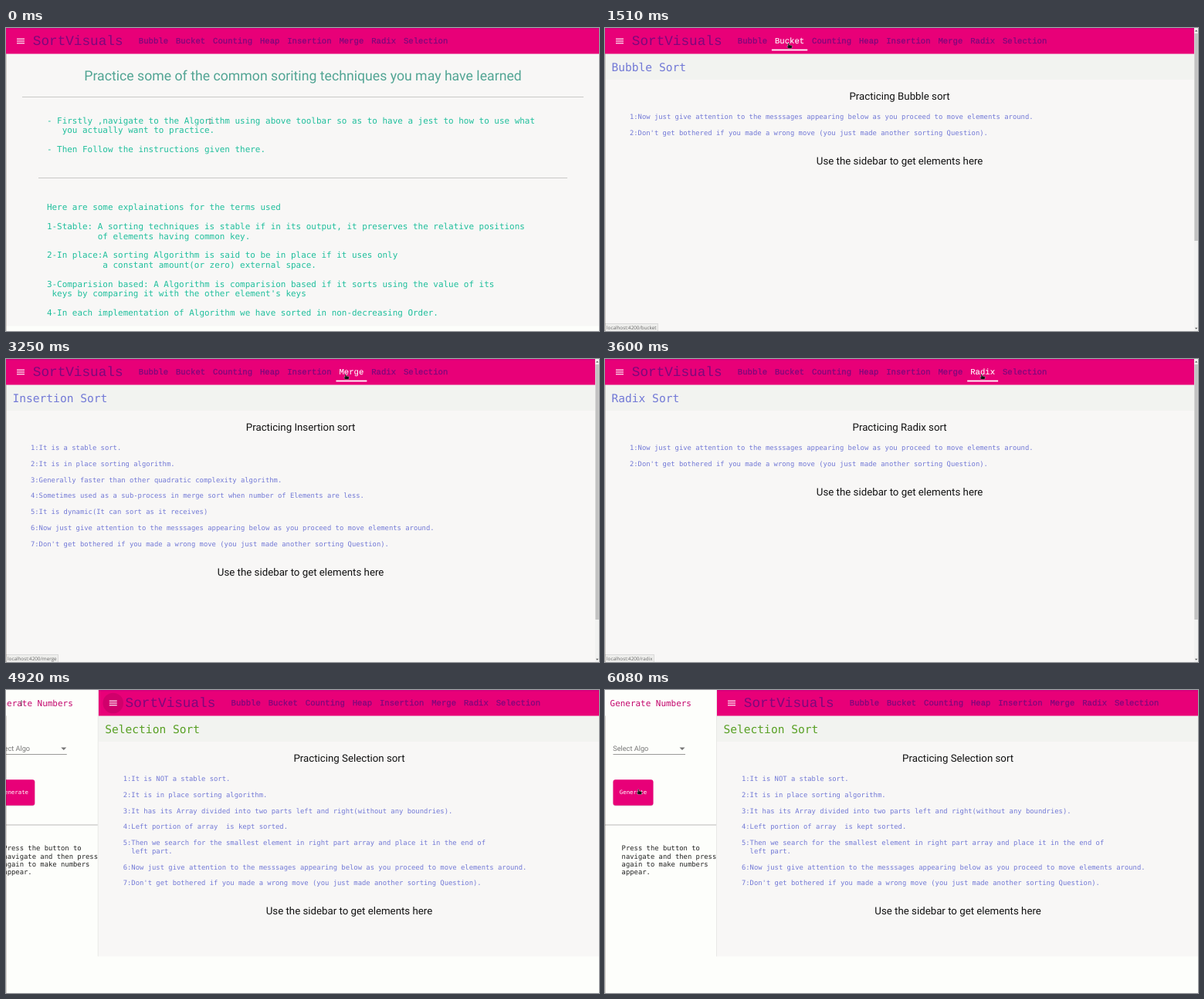
Write an HTML page that moves like this. It is 768x393 px and loops after 6100 ms.

```html
<!DOCTYPE html>
<html lang="en">
<head>
<meta charset="utf-8">
<title>SortVisuals</title>
<style>
  html, body { margin: 0; width: 100%; height: 100%; overflow: hidden; background: #fdfefb; }
  svg { display: block; width: 768px; height: 393px; }
  text { white-space: pre; text-rendering: geometricPrecision; }
  .mono { font-family: "DejaVu Sans Mono", monospace; }
  .nav { font-family: "Liberation Mono", monospace; fill: #7d087c; }
  .link { font-size: 10.64px; stroke: #7d087c; stroke-width: .25px; }
  .link.on { fill: #fff; stroke: #fff; stroke-width: .1px; }
  .sans { font-family: Roboto, sans-serif; }
  .mid { text-anchor: middle; }
  .status { font: 6.3px "Open Sans", sans-serif; fill: #666; }
</style>
</head>
<body>
<svg id="stage" viewBox="0 0 768 393"></svg>
<script>
const PINK = '#e80078', BLUE = '#7279d6', LOOP = 6100;

const rect = (x, y, w, h, fill, more = '') =>
  `<rect x="${x}" y="${y}" width="${w}" height="${h}" fill="${fill}" ${more}/>`;
const text = (x, y, size, fill, s, cls = 'mono') =>
  `<text x="${x}" y="${y}" font-size="${size}" fill="${fill}" class="${cls}">${s}</text>`;
const group = (id, body, more = '') => `<g id="${id}" ${more}>${body}</g>`;

// Navigation links, laid out from their character counts
let nextX = 171.8;
const links = ['Bubble', 'Bucket', 'Counting', 'Heap', 'Insertion', 'Merge', 'Radix', 'Selection'].map(name => {
  const link = { name, x: nextX, w: name.length * 6.384 };
  nextX += link.w + 9.8;
  return link;
});

const closing = n => [
  `${n}:Now just give attention to the messsages appearing below as you proceed to move elements around.`, '',
  `${n + 1}:Don't get bothered if you made a wrong move (you just made another sorting Question).`];

const homeLines = [
  '- Firstly ,navigate to the Algorithm using above toolbar so as to have a jest to how to use what',
  '   you actually want to practice.', '',
  '- Then Follow the instructions given there.', '', '', '', '', '',
  'Here are some explainations for the terms used', '',
  '1-Stable: A sorting techniques is stable if in its output, it preserves the relative positions',
  '          of elements having common key.', '',
  '2-In place:A sorting Algorithm is said to be in place if it uses only',
  '           a constant amount(or zero) external space.', '',
  '3-Comparision based: A Algorithm is comparision based if it sorts using the value of its',
  " keys by comparing it with the other element's keys", '',
  '4-In each implementation of Algorithm we have sorted in non-decreasing Order.'];

const pages = {
  Counting: {
    title: '#808080', ink: '#1c1c1c', thumb: 276, heading: 'Practicing Counting Sort.',
    footer: 'Get elements here using sidebar', footInk: '#7b7b7b',
    xs: [274.3, , 248, , 146.6, , 194.6, , 250.5, , 258.5, 352, , 256, 269.5, , 295.7],
    lines: [
      '1:Its correct Implementation is stable always.', '',
      '2:It is used as a subsequence for Radix and Bucket Sort.', '',
      '3:Its complexity is pseudo-linear( based on values of elements and not on number of elements).', '',
      '4:It uses an extra array to keep record of how many times a key is occuring', '',
      '5:Its principle is similar to as of PiegonHole Sorting.', '',
      '6:In this exercise Stability of counting sort is not',
      'taken into account.', '',
      '7:To follow this exercise just count number of times',
      'a value is present and use slider to indicate this', '',
      '8:On completion click on Make My Array']
  },
  Insertion: {
    thumb: 338,
    lines: [
      '1:It is a stable sort.', '',
      '2:It is in place sorting algorithm.', '',
      '3:Generally faster than other quadratic complexity algorithm.', '',
      '4:Sometimes used as a sub-process in merge sort when number of Elements are less.', '',
      '5:It is dynamic(It can sort as it receives)', '', ...closing(6)]
  },
  Selection: {
    title: '#58a024', bottom: 345.5,
    lines: [
      '1:It is NOT a stable sort.', '',
      '2:It is in place sorting algorithm.', '',
      '3:It has its Array divided into two parts left and right(without any boundries).', '',
      '4:Left portion of array  is kept sorted.', '',
      '5:Then we search for the smallest element in right part array and place it in the end of',
      '  left part.', '', ...closing(6)]
  },
  Bubble: { thumb: 276 }, Bucket: { thumb: 276 }, Heap: { thumb: 310 },
  Merge: { thumb: 338 }, Radix: { thumb: 338 }
};

function sortPage(name, p) {
  const { title = BLUE, ink = BLUE, thumb, bottom = 393, lines = closing(1), xs = [] } = p;
  const mid = thumb ? 381.6 : 384.6;
  const footY = 156 + (lines.length - 1) * 10.42;
  const button = name !== 'Counting' ? '' :
    rect(138, 41.5, 66, 19, '#0003', 'rx="2"') + rect(138, 40.5, 66, 19, '#fff', 'rx="2"') +
    text(171, 52.7, 7.35, '#111', 'Make My Array', 'sans mid" font-weight="500');
  return rect(0, 33, 768, bottom - 33, '#f8f7f6') + rect(0, 33, 768, 34, '#f2f3f0') +
    text(8.4, 55.5, 14.6, title, name + ' Sort') + button +
    lines.map((s, i) => text(xs[i] ?? 31.9, 117.9 + i * 10.42, 8.87, ink, s)).join('') +
    `<g class="centred">` +
    text(mid, 92.9, 13.28, '#111', p.heading || `Practicing ${name} sort`, 'sans mid') +
    text(mid, footY, 13.28, p.footInk || '#111', p.footer || 'Use the sidebar to get elements here', 'sans mid') +
    `</g>`;
}

const homePage = rect(0, 33, 768, 353.5, '#f8f7f6') +
  text(384.5, 67.8, 17.7, '#52a594', 'Practice some of the common soriting techniques you may have learned', 'sans mid') +
  rect(21, 89, 727, 1, '#c9c9c7') + rect(42, 194, 685, 1, '#c9c9c7') +
  homeLines.map((s, i) => text(52.9, 123.9 + i * 12.47, 10.945, '#1fbf9c', s)).join('');

const header = rect(0, 0, 768, 33.5, PINK) + rect(0, 0, 768, 1.5, '#d4007c') +
  '<circle id="press" cx="19" cy="17" r="13.3"/>' +
  [13.6, 16.4, 19.2].map(y => rect(14, y, 10, 1.15, '#fff')).join('') +
  text(34.8, 22.4, 17.7, '', 'SortVisuals', 'nav') +
  links.map(l => text(l.x, 20, '', '', l.name, 'nav link')).join('') +
  rect(0, 27.6, 0, 1.8, '#fff', 'id="bar"');

const sidebar = rect(0, 0, 144.5, 393, '#fdfefb') + rect(144, 0, 1, 345.5, '#e8e8e6') +
  text(6.6, 21, 10.945, '#c4076e', 'Generate Numbers') +
  text(10.2, 79.2, 9.2, '#777', 'Select Algo', 'sans') +
  '<path d="M96.5 74.4h7l-3.5 3.5z" fill="#757575"/>' + rect(10.5, 83, 93.5, 1, '#9a9a98') +
  rect(10.5, 117, 52, 33.5, '#0002', 'rx="3"') + rect(10.5, 116.3, 52, 33.4, PINK, 'rx="3"') +
  text(18.8, 135, 7.36, '#fff', 'Generate') + rect(0, 174.5, 144, 1, '#b9b9b7') +
  ['Press the button to', 'navigate and then press', 'again to make numbers', 'appear.']
    .map((s, i) => text(21.6, 208.2 + i * 10.42, 8.87, '#222', s)).join('');

const scrollbar = rect(763, 0, 5, 393, '#f1f1f0') + rect(763.4, 7, 4.4, 0, '#c1c1c1', 'id="thumb"') +
  '<path d="M764 4.5l1.7-2 1.7 2zM764 388.7l1.7 2 1.7-2z" fill="#555"/>';

const pointers =
  group('arrow', '<path d="M0 0v7l1.6-1.4 1.2 2.6 1.2-.6-1.2-2.5h2.2z" fill="#111" stroke="#fff" stroke-width=".4"/>') +
  group('hand', '<path d="M-1 0q.8-.8 1.5 0v2l3 .6q1 .3.9 1.4l-.6 2.5h-4.2l-2.3-2.5q.3-.9 1.7-.2z" fill="#111" stroke="#fff" stroke-width=".3"/>') +
  group('beam', '<path d="M-1-3h2M0-3v6M-1 3h2" fill="none" stroke="#444" stroke-width=".7"/>');

const pageNames = ['Home', ...Object.keys(pages)];
document.getElementById('stage').innerHTML =
  group('main', group('Home', homePage) +
    Object.entries(pages).map(([name, p]) => group(name, sortPage(name, p))).join('') + header) +
  group('side', sidebar) + group('scroll', scrollbar) +
  group('status', rect(0, 383.5, 0, 10, '#eeeeec', 'id="tip" stroke="#ccc" stroke-width=".6"') +
    text(2, 390.6, '', '', '', 'status" id="url')) +
  rect(0, 33.5, 1, 359.5, '#30180030') + pointers;

const el = id => document.getElementById(id);
const show = (id, on) => { el(id).style.display = on ? '' : 'none'; };
const move = (node, x, y = 0) => node.setAttribute('transform', `translate(${x} ${y})`);
const linkNodes = [...document.querySelectorAll('.link')];
const centred = document.querySelector('#Selection .centred');

// time, page, address shown at the bottom left
const visits = [
  [0, 'Home', ''], [1000, 'Home', 'bubble'], [1130, 'Bubble', 'bubble'], [1480, 'Bubble', 'bucket'],
  [1520, 'Bucket', 'bucket'], [1880, 'Bucket', 'counting'], [1920, 'Counting', 'counting'],
  [2440, 'Counting', 'heap'], [2480, 'Heap', 'heap'], [2980, 'Heap', 'insertion'],
  [3000, 'Insertion', 'insertion'], [3250, 'Insertion', 'merge'], [3300, 'Merge', 'merge'],
  [3550, 'Merge', 'radix'], [3600, 'Radix', 'radix'], [3950, 'Radix', 'selection'],
  [3980, 'Selection', 'selection'], [4100, 'Selection', 'bubble'], [4590, 'Selection', '']];

// time, x, y of the pointer
const path = [
  [500, 264, 121], [940, 173, 28.5], [1110, 186, 20], [1340, 186, 20], [1480, 238, 20], [1790, 238, 20],
  [1900, 283, 19.5], [2350, 283, 19.5], [2450, 340, 20], [2950, 340, 20], [2990, 392, 20], [3230, 392, 20],
  [3250, 440, 20], [3420, 440, 20], [3550, 488, 20], [3930, 488, 20], [3950, 540, 20], [4000, 540, 20],
  [4090, 205, 24], [4140, 202, 30], [4240, 202, 30], [4500, 20, 17], [5250, 20, 17],
  [5520, 48, 76], [5860, 48, 76], [6060, 43.5, 129]];

function pointerAt(t) {
  const i = path.findIndex(k => k[0] > t);
  if (i <= 0) return (i ? path.at(-1) : path[0]).slice(1);
  const [a, b] = [path[i - 1], path[i]];
  const u = (t - a[0]) / (b[0] - a[0]), e = u * u * (3 - 2 * u);
  return [a[1] + (b[1] - a[1]) * e, a[2] + (b[2] - a[2]) * e];
}

// cubic-bezier(.25, .8, .25, 1), solved by bisection
function ease(x) {
  if (x <= 0 || x >= 1) return x <= 0 ? 0 : 1;
  let lo = 0, hi = 1;
  const curve = (s, a, b) => 3 * (1 - s) ** 2 * s * a + 3 * (1 - s) * s * s * b + s ** 3;
  for (let i = 0; i < 24; i++) {
    const s = (lo + hi) / 2;
    if (curve(s, .25, .25) < x) lo = s; else hi = s;
  }
  return curve(lo, .8, 1);
}

function draw(t) {
  const [, page, address] = visits.findLast(v => v[0] <= t);
  const [x, y] = pointerAt(t);
  const slide = 145 * ease((t - 4733) / 560);
  const thumb = pages[page]?.thumb;

  pageNames.forEach(name => show(name, name === page));
  move(el('main'), slide);
  move(centred, -slide / 2);
  move(el('side'), slide - 145);
  show('side', slide > 0);
  show('scroll', thumb);
  el('thumb').setAttribute('height', (thumb || 7) - 7);

  // highlight behind the menu icon, fading after the click
  const fade = Math.min(1, (5350 - t) / 300);
  el('press').setAttribute('fill-opacity', t < 4690 ? 0 : Math.max(0, .1 * fade));

  const over = y < 29.5 && !slide ? links.findIndex(l => x > l.x - 4.3 && x < l.x + l.w + 4.3) : -1;
  linkNodes.forEach((n, i) => n.classList.toggle('on', i === over));
  const hit = links[over];
  el('bar').setAttribute('x', hit ? hit.x - 4 : 0);
  el('bar').setAttribute('width', hit ? hit.w + 8 : 0);

  show('status', address);
  if (address) {
    const url = el('url');
    url.textContent = 'localhost:4200/' + address;
    el('tip').setAttribute('width', url.getComputedTextLength() + 4);
  }

  const onButton = slide > 140 && x > 11 && x < 62 && y > 116 && y < 150;
  const onText = (page === 'Home' && y > 105) || (slide > 40 && y < 26);
  const kind = hit || onButton ? 'hand' : onText ? 'beam' : 'arrow';
  ['arrow', 'hand', 'beam'].forEach(k => show(k, k === kind));
  move(el(kind), x, y);
}

const start = performance.now();
(function tick() {
  draw((performance.now() - start) % LOOP);
  requestAnimationFrame(tick);
})();
</script>
</body>
</html>
```
